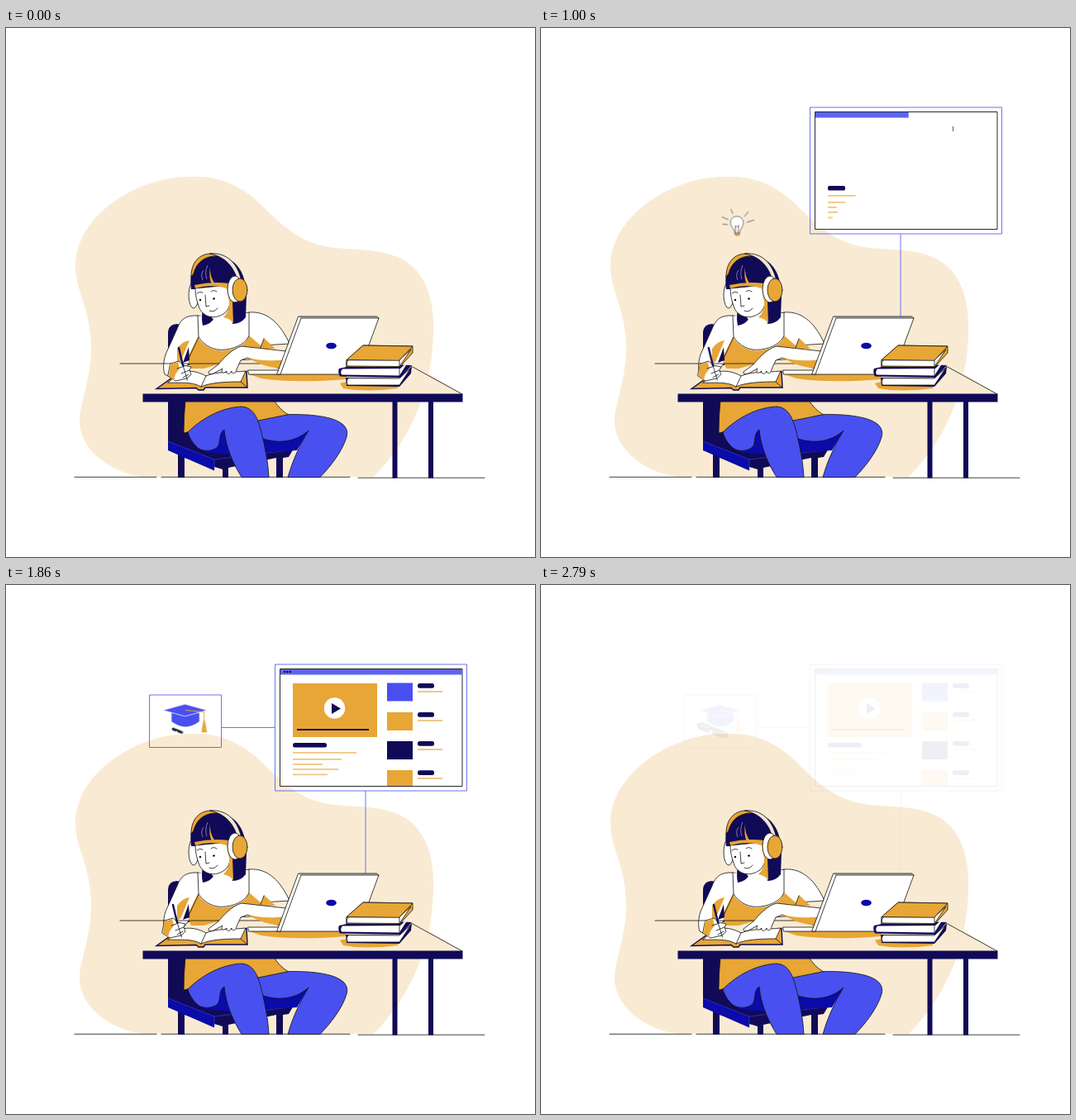
Write an HTML page without scripts that moves like this. It is 640x640 px and loops after 2870 ms.

```html
<!DOCTYPE html>
<html lang="en">
<head>
<meta charset="utf-8">
<title>Studying online</title>
<style>
  html, body { margin: 0; width: 100%; height: 100%; overflow: hidden; background: #fff; }
  svg { display: block; width: 100vw; height: 100vh; }

  .navy { fill: #110a57; }
  .deep { fill: #0a0ba8; }
  .blue { fill: #4850f0; }
  .gold { fill: #e7a636; }
  .sand { fill: #f9ebd3; }
  .white { fill: #fff; }
  .pale { fill: #efc884; }
  .ink { stroke: #111; stroke-width: .8; stroke-linejoin: round; stroke-linecap: round; }
  .none { fill: none; }
  .wire { fill: none; stroke: #4850f0; stroke-width: .8; vector-effect: non-scaling-stroke; }

  .anim, .pop, .grow, .early {
    animation: 2.87s linear var(--d, 0ms) infinite backwards;
  }
  .pop { transform-box: fill-box; transform-origin: center; animation-name: pop; }
  .grow, .early { transform-box: fill-box; transform-origin: left; }
  .grow { animation-name: grow; }
  .early { animation-name: early; }

  #hand { animation-name: write; }
  #bulb { animation-name: swing; }
  #bulb-size { transform-origin: 0 16px; animation-name: bulb; }
  #scene { animation-name: fade; }
  #cable { transform-origin: 435px 349px; animation-name: cable; }
  #window { transform-origin: 441px 249px; animation-name: unfold; }
  #link { transform-origin: 325px 172px; animation-name: link; }
  #card { transform-origin: 261px 165px; animation-name: card; }
  #progress { transform-origin: 352px 175px; animation-name: progress; }
  #cap { transform-origin: 216.5px 162px; animation-name: cap; }
  #diploma { transform-origin: 207.5px 176.5px; animation-name: diploma; }

  @keyframes write {
    0% { transform: none }
    10.1% { transform: translate(-2px, -1px) }
    24.7% { transform: translate(-5px, 0) }
    34% { transform: translate(-7px, 0) }
    42% { transform: translate(0, 0) }
    45% { transform: translate(-1px, 0) }
    64.8% { transform: translate(-7px, 0) }
    77% { transform: translate(-12px, -1px) }
    81% { transform: translate(-13px, -1px) }
    94%, 100% { transform: none }
  }
  @keyframes swing {
    0%, 10.1% { transform: translate(231px, 238px) rotate(-17deg) }
    24.7%, 100% { transform: translate(237px, 234px) }
  }
  @keyframes bulb {
    0%, 2% { transform: scale(0) }
    8%, 33% { transform: scale(1) }
    39.5%, 100% { transform: scale(0) }
  }
  @keyframes fade {
    0%, 80.5% { opacity: 1 }
    98.5%, 100% { opacity: 0 }
  }
  @keyframes cable {
    0%, 10.2% { transform: scaleY(0) }
    16%, 100% { transform: scaleY(1) }
  }
  @keyframes unfold {
    0%, 15.9% { transform: scaleY(0) }
    19.9% { transform: scaleY(.27) }
    24.7% { transform: scaleY(.647) }
    29% { transform: scaleY(.93) }
    32%, 100% { transform: scaleY(1) }
  }
  @keyframes early {
    0%, 30% { transform: scaleX(0) }
    39.5%, 100% { transform: scaleX(1) }
  }
  @keyframes grow {
    0%, 34.5% { transform: scaleX(0) }
    46.5%, 100% { transform: scaleX(1) }
  }
  @keyframes pop {
    0%, 35% { transform: scale(0) }
    41% { transform: scale(1.1) }
    46%, 100% { transform: scale(1) }
  }
  @keyframes progress {
    0%, 46.5% { transform: scaleX(0) }
    59%, 100% { transform: scaleX(1) }
  }
  @keyframes link {
    0%, 39.5% { transform: scaleX(0) }
    44.4%, 100% { transform: scaleX(1) }
  }
  @keyframes card {
    0%, 44.4% { transform: scaleX(0) }
    45% { transform: scaleX(.045) }
    53%, 100% { transform: scaleX(1) }
  }
  @keyframes cap {
    0%, 54% { transform: scale(0) }
    63%, 64.8% { transform: scale(1.05) }
    69%, 100% { transform: scale(1) }
  }
  @keyframes diploma {
    0%, 62.4% { transform: scale(0) }
    64.8% { transform: scale(.35) }
    70% { transform: scale(1.06) }
    75%, 100% { transform: scale(1) }
  }
</style>
</head>
<body>
<svg viewBox="0 0 640 640">
  <path class="sand" d="M222 180C262 178 290 194 315 220C336 241 360 262 398 266C428 269 446 267 471 276C504 288 518 322 517 364C517 425 497 490 445 543H165C128 538 89 512 89 475C89 455 103 425 103 387C103 340 84 320 84 287C84 230 155 180 222 180Z"/>
  <path class="ink none" d="M83 543.3H182M188 543.3H416M426 544.2H579"/>

  <!-- chair and legs -->
  <g>
    <path class="navy" d="M196 448H218V488L355 497L342 519L335 520V544H327V520L269 532V544H262V534L216 520V544H208V514L196 508Z"/>
    <path class="deep" d="M196 500L252 522V535.500L196 511Z"/>
    <path d="M196 500L252 522L342 511M252 522V535" fill="none" stroke="#4850f0" stroke-width=".5"/>
    <path class="deep" d="M240 513L262 485H310L368 484L352 511L272 516Z"/>
    <path class="gold ink" d="M217 450H324Q331 462 342 468L306 478L220 489L215 490Q215 470 217 450Z"/>
    <path class="blue ink" d="M305 475Q325 471 342 467.500C368 467 391 470 402 476C412 481 414 488 412 495C407 512 393 530 380 543.5H341C347 522 355 506 366 487C349 502 328 503 308 496Z"/>
    <path class="blue ink" d="M220 489C238 471 262 459 285 458C299 459 304 471 308 485C313 505 317 524 318 543.5H285C273 524 266 506 264 486C257 490 260 502 256 507C249 513 236 513 230 506C225 501 221 494 220 489Z"/>
  </g>

  <!-- torso -->
  <path class="navy" d="M196 408V368Q197 358 207 358L222 363V408Z"/>
  <path class="white ink" d="M232 348C217 347 211 353 207 364L193 395C190 405 190 413 192 419L206 426L221 406L309 400V384L343 382C333 360 318 342 294 344L271 350H247Z"/>
  <path class="white" d="M232 349L248 346H272L294 345V372L266 390L233 374Z"/>
  <path class="gold" d="M232 374C240 386 253 392 266 390C281 388 291 382 294 372L309 385L290 400L264 412H224L219 400Z"/>
  <path class="gold" d="M308 388L312 375L326 388ZM207 388Q213 379 222 378L211 404L207 405Z"/>
  <path class="navy" d="M221 386L222 402L214 405Z"/>
  <path class="ink none" d="M232 348L233 374C240 384 251 391 266 389C281 387 291 380 294 372V344M233 374L220 402M307 389L312 376"/>
  <path class="sand" d="M165 443L193 425L260 406H491L552 443Z"/>
  <path class="ink none" d="M138 406H308M491 409.500L552 443"/>

  <!-- shadows on the desk -->
  <path class="gold" d="M294 419H412V425Q350 430 309 424Z"/>
  <path class="gold" d="M404 430Q414 425 474 431V436Q435 441 408 436Z"/>

  <!-- open book -->
  <path class="gold" stroke="#110a57" stroke-width="1.400" d="M182 436.500L201 423L236 430L291 415.500L292 435H241L239 438H233L230 435.500Z"/>
  <path class="white ink" d="M196 429L210 417C222 413 233 416 242 421C256 415 272 417 290 415L284 428C265 428 247 429 236 434C224 427 209 430 196 429Z"/>
  <path class="ink none" d="M242 421L236 434M284 428L292 435"/>

  <!-- forearm and resting hand -->
  <path class="white ink" d="M344 384L339 391L285 385C273 388 262 401 257 407L245 416Q244 420 251 418L262 412C259 417 263 419 267 415C266 419 271 420 273 415C273 419 278 419 279 413L284 402L292 399L331 412L343 397Z"/>
  <path class="gold" d="M291 398C305 403 321 403 339 401L333 412Q309 410 291 398Z"/>

  <!-- writing hand -->
  <g id="hand" class="anim">
    <path class="white ink" d="M199 406L209 403L215 408L224 410L222 414L224 419L219 424L205 427L196 421Z"/>
    <path class="gold" d="M198 407L208 404L210 412L205 419L203 426L197 421Z"/>
    <path class="ink none" d="M207 412L216 409M212 418L222 414M214 423L221 419"/>
    <path d="M209 387L214 408" stroke="#110a57" stroke-width="2.4" stroke-linecap="round"/>
    <path class="ink" d="M214 408L219.500 426"/>
  </g>

  <!-- head -->
  <g>
    <ellipse class="white ink" cx="227" cy="323" rx="6" ry="16"/>
    <path class="navy" d="M224 316C221 290 229 276 252 275C277 276 290 294 291 323L290 350Q284 358 274 358L271 314L228 316ZM238 341L252 350Q249 358 238 360Q236 351 238 341Z"/>
    <path class="white" d="M251 346H273V357Q262 358 249 351Z"/>
    <path class="white ink" d="M229 315L270 311C273 325 273 340 263 346C250 354 238 348 234 339C231 331 229 324 229 315Z"/>
    <path class="gold" d="M228 311Q250 306 270 309L274 330L275 357Q272 352 263 350Q271 343 270 331L267 315Q250 309 229 315Z"/>
    <path class="gold" d="M247 289Q246 300 253 310H249Q245 302 247 289Z"/>
    <path d="M239 293Q235 298 238 305M244 287Q240 296 243 304" fill="none" stroke="#aaa6cf" stroke-width=".7"/>
    <path class="ink none" d="M231 321Q234 318 238 320M248 319Q251 316 255 319M241 323L242 337L246 336M246 342Q251 345 256 339"/>
    <circle cx="235" cy="329" r="1.200"/>
    <circle cx="251.500" cy="327.500" r="1.200"/>
    <path class="gold ink" d="M224 301C224 280 237 272 251 273L258 276C242 275 231 282 227 297Z"/>
    <path class="ink" fill="#f3e3dc" d="M247 273C268 271 281 286 285 307L281 308C276 289 266 277 247 273Z"/>
    <ellipse class="white ink" cx="277" cy="316" rx="9" ry="16"/>
    <ellipse class="gold ink" cx="283" cy="317" rx="9" ry="14"/>
  </g>

  <!-- laptop -->
  <path class="white ink" d="M293 414H332V419H294Z"/>
  <path class="white ink" d="M354 349H449L451 351L426 419H328Z"/>
  <path class="ink none" d="M451 351H357L332 419"/>
  <path d="M355 349.800H450" stroke="#777" stroke-width="1.500"/>
  <ellipse class="deep" cx="393.500" cy="384.500" rx="6.300" ry="3.800"/>

  <!-- stacked books -->
  <g>
    <path class="navy" d="M411 423L476 424L491 409L490 418L476 434L412 433Z"/>
    <path class="white ink" d="M414 423.500L476 424L490 411L476 432L413 432Q411 427 414 423.500Z"/>
    <path class="navy" d="M403 412L430 406L491 408L477 423L404 421.500Q401 416 403 412Z"/>
    <path class="white" d="M407 412.500L477 412L487 403L476 420.500L406 419.500Q404 416 407 412.500Z"/>
    <path class="ink none" d="M476 412V421"/>
    <path class="gold ink" d="M412 402L432 384L492 385V393L476 410.500L412 410Z"/>
    <path class="white ink" d="M414 401.500H476L490 389L476 409.500L413 409Q411 405 414 401.500Z"/>
    <path class="gold ink" d="M412 401.500L432 384L492 385L476 402Z"/>
    <path class="ink none" d="M476 402V410"/>
  </g>

  <!-- desk -->
  <path class="navy" d="M165.500 442.500H552.500V452.500H517V544.500H511V452.500H473.500V544.500H467.500V452.500H165.500Z"/>

  <g id="bulb" class="anim">
    <g id="bulb-size" class="anim">
      <path class="white ink" d="M-3.500 13C-3.500 6 -11 4 -11 -4C-11 -19 11 -19 11 -4C11 4 4.500 6 4.500 13Z"/>
      <path class="ink none" d="M-2 13L-3 1L0 3L3 0L2 13"/>
      <path class="gold" stroke="#111" stroke-width=".5" d="M-3.500 13H4.500V16L2 17.500H-1L-3.500 16Z"/>
      <path class="ink none" d="M-10-27L-7-20M13-15L19-23M17-5L29-9M-25-14L-15-10M-24-2L-16-1"/>
    </g>
  </g>

  <g id="scene" class="anim">
    <path id="cable" class="wire anim" d="M435 349V249"/>
    <g id="window" class="anim">
      <rect class="wire" x="325.500" y="96" width="232" height="153"/>
      <rect class="white" x="331.500" y="101.500" width="220.500" height="142" stroke="#111" stroke-width=".9" vector-effect="non-scaling-stroke"/>
    </g>
    <rect class="early" x="332" y="102" width="219.500" height="6.500" fill="#5c64f4"/>
    <g class="pop" style="--d:20ms">
      <circle cx="337" cy="105" r="1.200"/><circle cx="340.500" cy="105" r="1.200"/><circle cx="344" cy="105" r="1.200"/>
    </g>

    <rect class="gold pop" x="347" y="119" width="102" height="65"/>
    <g class="pop">
      <circle class="white" cx="397.500" cy="149" r="12.700"/>
      <path class="navy" d="M394 143L405 149.500L394 156Z"/>
    </g>
    <rect id="progress" class="navy anim" x="352" y="174" width="87" height="2"/>

    <rect class="navy early" x="347" y="191" width="41" height="5.500" rx="2.500"/>
    <g class="pale">
      <rect class="early" style="--d:20ms" x="347" y="202" width="77" height="1.800"/>
      <rect class="early" style="--d:40ms" x="347" y="210" width="59" height="1.800"/>
      <rect class="early" style="--d:60ms" x="347" y="216" width="36" height="1.800"/>
      <rect class="early" style="--d:80ms" x="347" y="222" width="55" height="1.800"/>
      <rect class="early" style="--d:100ms" x="347" y="228.500" width="42" height="1.800"/>
    </g>

    <rect class="blue pop" style="--d:85ms" x="461" y="118.500" width="31" height="22"/>
    <rect class="gold pop" style="--d:115ms" x="461" y="154" width="31" height="22"/>
    <rect class="navy pop" style="--d:145ms" x="461" y="189" width="31" height="22"/>
    <rect class="gold pop" style="--d:170ms" x="461" y="224" width="31" height="19"/>
    <g class="navy">
      <rect class="grow" x="498" y="119" width="20" height="5.800" rx="2.500"/>
      <rect class="grow" style="--d:65ms" x="498" y="154" width="20" height="5.800" rx="2.500"/>
      <rect class="grow" style="--d:125ms" x="498" y="189" width="20" height="5.800" rx="2.500"/>
      <rect class="grow" style="--d:195ms" x="498" y="224.300" width="20" height="5.800" rx="2.500"/>
    </g>
    <g class="pale">
      <rect class="grow" style="--d:70ms" x="498" y="128" width="30" height="2"/>
      <rect class="grow" style="--d:160ms" x="498" y="163" width="30" height="2"/>
      <rect class="grow" style="--d:205ms" x="498" y="198" width="30" height="2"/>
      <rect class="grow" style="--d:255ms" x="498" y="233" width="30" height="2"/>
    </g>

    <path id="link" class="wire anim" d="M325 172.500H261"/>
    <rect id="card" class="wire anim" x="173.500" y="133" width="87" height="63.500"/>
    <g id="cap" class="anim">
      <path class="blue" d="M201 155H233V165Q217 177 201 165Z"/>
      <path class="blue" d="M191 152L216.500 145L242 152L216.500 159Z" stroke="#fff" stroke-width=".7"/>
      <path d="M217 152L238.500 154V167" fill="none" stroke="#e7a636" stroke-width="1"/>
      <path class="gold" d="M237.500 164H239.500L242 177.500H235.500Z"/>
    </g>
    <g id="diploma" class="anim">
      <path d="M193 170.500L222 181.500" stroke="#111527" stroke-width="9" stroke-linecap="round"/>
      <path d="M193 169L203 173M210 177L218 180" stroke="#fff" stroke-width=".6"/>
      <ellipse cx="222" cy="181.500" rx="2.400" ry="3.600" transform="rotate(20 222 181.500)" fill="none" stroke="#fff" stroke-width=".7"/>
      <circle class="white" cx="205" cy="178" r="2.500"/>
    </g>
  </g>
</svg>
</body>
</html>
```
